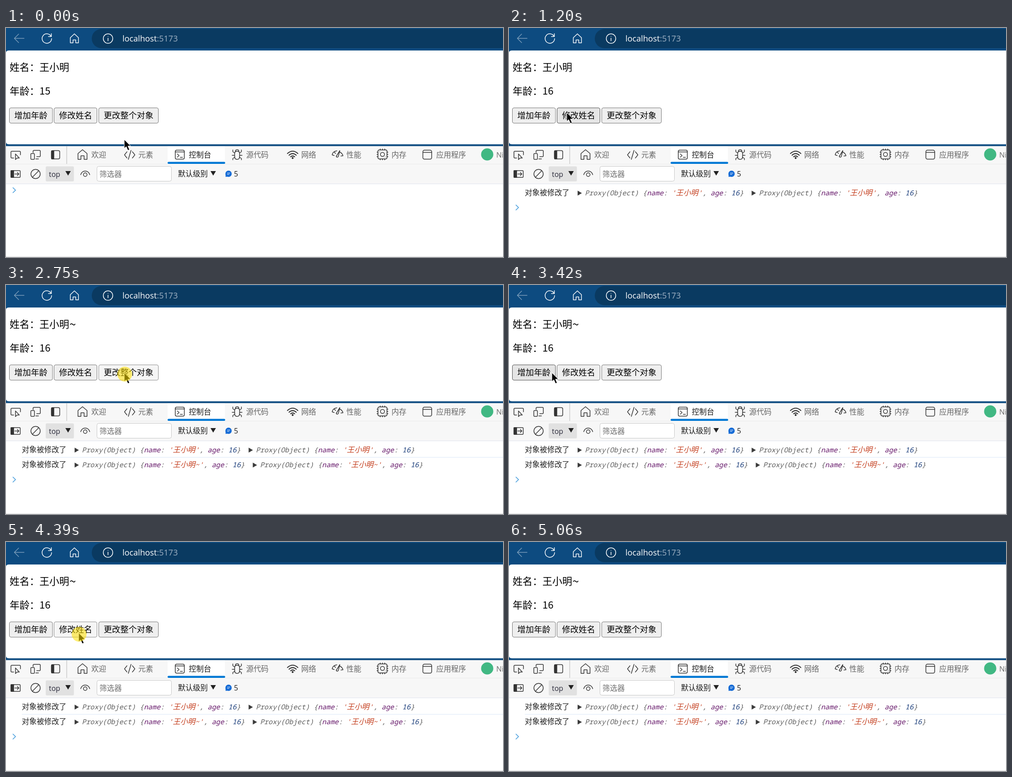
Write an HTML page that moves like this. It is 1101 px wide and 509 px high and loops after 5080 ms.

```html
<!DOCTYPE html>
<html lang="zh">
<head>
<meta charset="utf-8">
<title>Console demo</title>
<style>
  html, body { margin: 0; width: 100%; height: 100%; overflow: hidden; background: #fff; }
  svg { display: block; }
  text { font-family: "Open Sans", "Noto Sans CJK SC", "Noto Sans CJK", sans-serif; font-size: 16.5px; white-space: pre; }
  .cjk { font-family: "Noto Sans CJK SC", "Noto Sans CJK", sans-serif; font-weight: 350; }
  .page { font-size: 22px; fill: #000; }
  .label { font-size: 18.33px; fill: #000; }
  .mono { font-family: "Noto Sans Mono", monospace; font-size: 15.28px; font-style: italic; fill: #5f5f5f; }
  .mono .key { fill: #671a6b; }
  .mono .str { fill: #c43f1f; }
  .mono .han { font-family: "Noto Sans CJK SC", "Noto Sans CJK", sans-serif; font-size: 16.5px; font-weight: 350; }
  .mono .num { fill: #173a78; }
  .icon { fill: none; stroke: #333; stroke-width: 1.5; stroke-linecap: round; stroke-linejoin: round; }
  .icon .solid { fill: #333; }
  .nav { stroke: #fff; }
</style>
</head>
<body>
<svg id="stage" width="1101" height="509" viewBox="0 0 1101 509"></svg>
<script>
const LOOP = 5080;
const stage = document.getElementById('stage');
const text = (x, y, s, attrs = '') => `<text x="${x}" y="${y}" ${attrs}>${s}</text>`;
const rect = (x, y, w, h, attrs = '') => `<rect x="${x}" y="${y}" width="${w}" height="${h}" ${attrs}/>`;
const path = (d, attrs = '') => `<path d="${d}" ${attrs}/>`;
const circle = (x, y, r, attrs = '') => `<circle cx="${x}" cy="${y}" r="${r}" ${attrs}/>`;
const icon = (content, cls = '') => `<g class="icon ${cls}">${content}</g>`;

const buttons = [
  { x: 7.5, w: 95.5, label: '增加年龄' },
  { x: 106.5, w: 95, label: '修改姓名' },
  { x: 205.5, w: 132, label: '更改整个对象' },
];

// Cursor moves: first step, last step, step count, end point
const moves = [
  [50, 280, 6, 66, 192],
  [880, 1010, 3, 110, 190],
  [1160, 1200, 2, 128, 189],
  [2130, 2130, 1, 146, 187],
  [2170, 2370, 5, 262, 196],
  [3240, 3420, 4, 95, 196],
  [3470, 3570, 3, 64, 196],
  [4020, 4160, 4, 161, 203],
  [4660, 5060, 10, 250, 520],
];

// Clicks: highlight on, button pressed, released
const clicks = [
  [420, 466, 513],
  [1520, 1570, 1620],
  [2750, 2750, 2890],
  [3760, 3760, 3850],
  [4390, 4390, 4480],
];

function browserBar() {
  return rect(0, 0, 1101, 263, 'fill="#0d4b80"') +
    rect(190, 2, 960, 43, 'rx="21.5" fill="#0a3a61"') +
    icon(path('M40 23H19M28 13.5L18.5 23L28 32.5', 'opacity=".45"') +
      path('M99.8 18.5A10.5 10.5 0 1 0 101 23.5M100.5 12.5V19H94') +
      path('M142.5 21.5L151.5 13L160.5 21.5V33H154.5V26.5H148.5V33H142.5Z') +
      circle(226, 23.5, 10.5) + path('M226 22.5V28.5M226 18.5V18.6'), 'nav') +
    text(258, 30, 'localhost<tspan fill="#9fb2c4">:5173</tspan>', 'fill="#fff" style="font-size:18.2px"');
}

function tabBar() {
  const tabs = [[189, '欢迎'], [293, '元素'], [405, '控制台'], [532, '源代码'], [654, '网络'],
    [754, '性能'], [854, '内存'], [953, '应用程序']];
  let teeth = '';
  for (let i = 0; i < 3; i++) {
    const d = 5 * i;
    teeth += `M${829 + d} 271V268.8M${829 + d} 291V293.2M824 ${276 + d}H821.8M844 ${276 + d}H846.2`;
  }
  return rect(0, 262.5, 1101, 83.5, 'fill="#f7f7f7"') +
    rect(358, 263, 127, 39, 'fill="#fff"') +
    path('M0 302.5H358M485 302.5H1101', 'stroke="#ebebeb"') +
    rect(358, 297.5, 127.5, 4.5, 'rx="2" fill="#0078d4"') +
    path('M134.5 263V302', 'stroke="#c9c9c9" stroke-width="1.5"') +
    tabs.map(([x, s]) => text(x, 288.3, s, `class="cjk" fill="${x === 405 ? '#1b1b1b' : '#666'}"`)).join('') +
    text(1086, 288, 'Ni', 'fill="#6e6e6e"') +
    circle(1066, 281, 13.5, 'fill="#41b883"') +
    icon(
      // inspect, devices, dock
      path('M17 289H13Q11 289 11 287V276Q11 274 13 274H30Q32 274 32 276V282') +
      path('M21 280V292.5L24.5 289H29.5Z') +
      path('M60 277V274Q60 272 62 272H74Q76 272 76 274V284Q76 286 74 286H68M66 291H72') +
      rect(55, 279, 8, 13, 'rx="1.5"') +
      rect(100.5, 272.5, 18.5, 18.5, 'rx="3"') + path('M101 273H106V291H101Z', 'class="solid"') +
      // welcome, elements, console
      path('M159.5 279L169.5 270.5L179.5 279V292H173V284H166V292H159.5Z') +
      path('M268 275L262.5 282L268 289M280 275L285.5 282L280 289M277 272L271 292') +
      rect(375, 271.5, 20, 20, 'rx="3"') + path('M375 275.5H395M379.5 280L383.5 283.5L379.5 287M386 287.5H391') +
      // sources
      path('M506.5 279Q506.5 274 512 274T517.5 279V286Q517.5 292 512 292T506.5 286ZM508 275Q508 270.5 512 270.5T516 275') +
      path('M506.5 278L502.5 275V271M517.5 278L521.5 275V271M506.5 283H501M517.5 283H523M507 287L502.5 290V293M517 287L521.5 290V293') +
      // network
      path('M623.5 279Q635 268.5 646.5 279M627 282.8Q635 275.5 643 282.8M630.5 286.3Q635 282.5 639.5 286.3', 'stroke-width="2"') +
      circle(635, 289, 1.4, 'class="solid"') +
      // performance
      path('M722.5 282Q724 274 733 273M739 275.5Q745 278 746.5 284M722.5 282L727 283.5M727 275.5L730 279M742 284.5L746.5 284') +
      path('M739.5 272.5L731.5 285.5Q733.5 288.5 736 286Z') +
      // memory
      rect(824, 271, 20, 20, 'rx="3"') + circle(834, 281, 4.5) + path(teeth) +
      path('M828 275V275.1M840 287V287.1') +
      // application
      rect(923.5, 271.5, 19.5, 20, 'rx="3.5"') + path('M923.5 276.5H943'));
}

function filterBar() {
  const dropArrow = x => path(`M${x} 318H${x + 12}L${x + 6} 328Z`, 'fill="#222"');
  return rect(88, 307.5, 62.5, 33.5, 'rx="3" fill="#e1e1e1"') +
    rect(201.5, 307.5, 165, 33, 'rx="4" fill="#fff" stroke="#c6c6c6"') +
    text(95, 330.5, 'top', 'fill="#2b2b3b" style="font-size:16px"') +
    dropArrow(131.5) + dropArrow(453) +
    text(207, 330.5, '筛选器', 'class="cjk" fill="#707070"') +
    text(381, 330, '默认级别', 'class="cjk" fill="#1b1b1b"') +
    circle(493, 324, 7, 'fill="#156bd6"') + path('M486.5 331V325L492 330Z', 'fill="#156bd6"') +
    path('M490 322.5H496.5M490 325.5H494.5', 'stroke="#fff" stroke-width="1.2"') +
    text(505, 330, '5', 'fill="#1b1b1b" style="font-size:16px"') +
    icon(rect(11, 317, 20.5, 15, 'rx="1.5"') + rect(11, 317, 6, 15, 'class="solid"') +
      path('M19.5 324.5H28M25 321L28.5 324.5L25 328') +
      circle(65.5, 324.5, 10.3) + path('M58.5 331.8L72.5 317.2') +
      path('M165.5 326Q168 318 175.5 318T185.5 326') + circle(175.5, 326, 4)) +
    path('M0 346.5H1101', 'stroke="#dfe3ee"') +
    path('M0 508.5H1101', 'stroke="#dedede"');
}

function logRow(id, y, suffix) {
  const shift = 9.17 * suffix.length;
  const span = (cls, s) => `<tspan class="${cls}">${s}</tspan>`;
  const object = x => path(`M${x - 16} ${y - 10.5}V${y + 0.5}L${x - 6.5} ${y - 5}Z`, 'fill="#3c3c3c"') +
    text(x, y, 'Proxy(Object) {' + span('key', 'name') + ': ' +
      span('str', `'${span('han', '王小明')}${suffix}'`) + ', ' +
      span('key', 'age') + ': ' + span('num', '16') + '}', 'class="mono"');
  return `<g id="${id}">` + text(35, y, '对象被修改了', 'class="cjk" fill="#222"') +
    object(168) + object(553.5 + shift) + '</g>';
}

stage.innerHTML = browserBar() +
  path('M1101 50H7Q0 50 0 55V253Q0 258.5 7 258.5H1101Z', 'fill="#fff"') +
  text(8, 95.3, '姓名：王小明', 'class="cjk page"') +
  text(140.5, 97, '~', 'id="tilde" class="cjk page" style="font-size:26px"') +
  text(8, 148.2, '年龄：<tspan id="age">15</tspan>', 'class="cjk page"') +
  buttons.map((b, i) => rect(b.x, 177.5, b.w, 34, `id="button${i}" rx="3.5"`) +
    text(b.x + 11, 201.3, b.label, 'class="cjk label"')).join('') +
  tabBar() + filterBar() +
  rect(0, 347, 1101, 161, 'fill="#fff"') +
  logRow('row0', 372, '') + logRow('row1', 405.3, '~') +
  path('M35 383H1101', 'id="rule" stroke="#d9e6f8"') +
  path('M15 354.5L21 360.5L15 366.5', 'id="prompt" fill="none" stroke="#4a9fdd" stroke-width="1.7"') +
  '<g id="cursor">' +
  path('M0 -1V18.5L4.3 14.6L8 23L11.6 21.4L8 13.3H14Z', 'fill="#000" stroke="#fff" stroke-width="1"') +
  circle(1, 2, 16.5, 'id="glow" fill="#ffe000" opacity=".55"') + '</g>';

const el = id => document.getElementById(id);
const show = (id, on) => el(id).setAttribute('visibility', on ? 'visible' : 'hidden');

function cursorAt(t) {
  let x = 262, y = 249;
  for (const [start, end, count, toX, toY] of moves) {
    if (t < start) break;
    const gap = (end - start) / (count - 1) || 1;
    const p = Math.min(count, Math.floor((t - start) / gap + 1e-6) + 1) / count;
    x += (toX - x) * p;
    y += (toY - y) * p;
  }
  return [x, y];
}

function draw(t) {
  const [x, y] = cursorAt(t);
  const glowing = clicks.some(([on, , up]) => t >= on && t < up);
  const pressed = clicks.some(([, down, up]) => t >= down && t < up);
  el('cursor').setAttribute('transform', `translate(${x} ${y})`);
  show('glow', glowing);

  buttons.forEach((b, i) => {
    const hover = x >= b.x && x <= b.x + b.w && y >= 177 && y <= 212;
    const [fill, stroke] = !hover ? ['#efefef', '#767676']
      : pressed ? ['#f5f5f5', '#8d8d8d'] : ['#e5e5e5', '#4f4f4f'];
    el('button' + i).setAttribute('fill', fill);
    el('button' + i).setAttribute('stroke', stroke);
  });

  const rows = (t >= 560) + (t >= 1620);
  el('age').textContent = t >= 513 ? '16' : '15';
  show('tilde', rows > 1);
  show('row0', rows > 0);
  show('row1', rows > 1);
  show('rule', rows > 1);
  el('prompt').setAttribute('transform', `translate(0 ${[0, 38.5, 72][rows]})`);
}

const begin = performance.now();
function tick() {
  draw((performance.now() - begin) % LOOP);
  requestAnimationFrame(tick);
}
draw(0);
requestAnimationFrame(tick);
</script>
</body>
</html>
```
